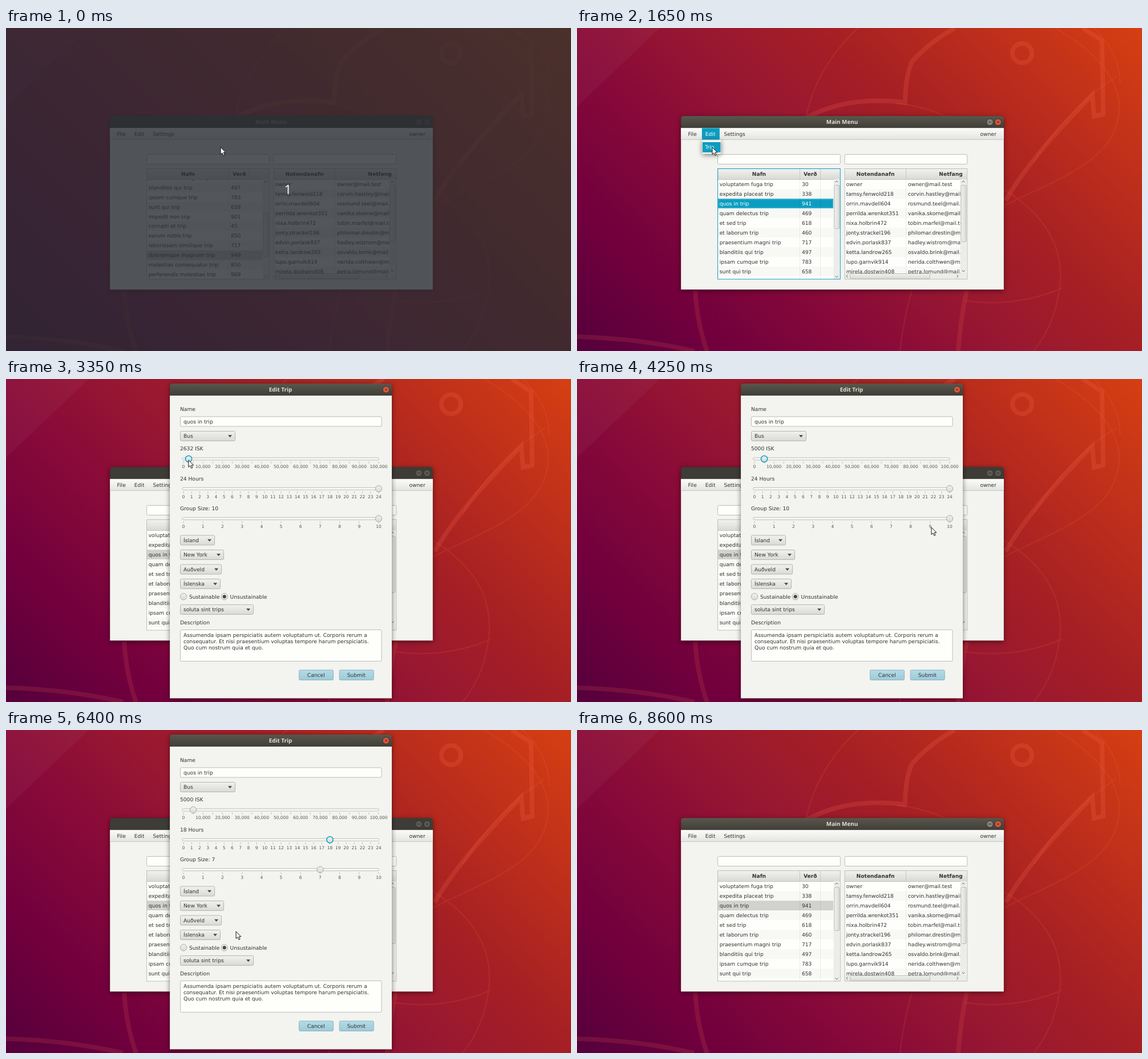
Write an HTML page that moves like this. It is 990 px wide and 566 px high and loops after 8650 ms.

```html
<!DOCTYPE html>
<html lang="is">
<head>
<meta charset="utf-8">
<title>Edit Trip</title>
<style>
  html, body { margin: 0; width: 100%; height: 100%; overflow: hidden; background: #8c0f38; }
  svg { display: block; width: 100%; height: 100%; }
  text { font: 9.15px "DejaVu Sans", sans-serif; fill: #333; text-rendering: geometricPrecision; white-space: pre; }
  .bold { font-weight: bold; }
  .tick { font-size: 7.5px; fill: #555; }
  .title { font: bold 9.85px "Noto Sans", sans-serif; }
  .count { font: 22.5px "Open Sans", sans-serif; fill: #fff; }
  .shadow { filter: drop-shadow(0 2px 4.5px rgba(0, 0, 0, .5)); }
  .wall { fill: none; stroke: #ff6a50; }
</style>
</head>
<body>
<svg viewBox="0 0 990 566" preserveAspectRatio="none">
  <defs>
    <linearGradient id="wall" gradientUnits="userSpaceOnUse" x1="0" y1="566" x2="778" y2="-212">
      <stop offset="0" stop-color="#55003c"/>
      <stop offset=".17" stop-color="#72003d"/>
      <stop offset=".36" stop-color="#8a0b38"/>
      <stop offset=".5" stop-color="#991831"/>
      <stop offset=".64" stop-color="#a51f24"/>
      <stop offset=".8" stop-color="#bb2d1c"/>
      <stop offset="1" stop-color="#d63f12"/>
    </linearGradient>
    <linearGradient id="bar" x2="0" y2="1"><stop stop-color="#59574d"/><stop offset="1" stop-color="#3f3e37"/></linearGradient>
    <linearGradient id="menu" x2="0" y2="1"><stop stop-color="#fbfbf9"/><stop offset="1" stop-color="#e4e4e1"/></linearGradient>
    <linearGradient id="grey" x2="0" y2="1"><stop stop-color="#f1f1ee"/><stop offset="1" stop-color="#d9d9d6"/></linearGradient>
    <linearGradient id="thumb" x2="1" y2="0"><stop stop-color="#f1f1ee"/><stop offset="1" stop-color="#d9d9d6"/></linearGradient>
    <linearGradient id="blue" x2="0" y2="1"><stop stop-color="#b3dbe7"/><stop offset="1" stop-color="#9dcad9"/></linearGradient>
    <clipPath id="leftRows"><rect x="247" y="265" width="202.5" height="175"/></clipPath>
    <clipPath id="rightRows"><rect x="469" y="247" width="203" height="183"/></clipPath>
    <clipPath id="rightHead"><rect x="469" y="247" width="214" height="18"/></clipPath>
  </defs>
  <rect width="990" height="566" fill="url(#wall)"/>
  <path d="M0 0H145L0 138Z" fill="#fff" opacity=".035"/>
  <g class="wall" stroke-width="8" opacity=".2">
    <circle cx="780" cy="44" r="17"/>
    <path d="M575 132C575 95 581 72 587 59Q618 24 662 0M886 0L920 22L922 151L906 155L903 117C850 172 792 232 751 302M398 160Q470 117 578 131"/>
    <path d="M683 460Q672 510 668 566M207 460Q211 520 228 566M0 541Q110 544 205 566" opacity=".75"/>
  </g>
  <g class="wall" stroke-width="2.5" opacity=".13">
    <path d="M401 158Q418 70 492 0M560 132Q610 137 648 156M838 0C925 50 965 110 945 170C925 240 830 270 747 312M748 283Q850 345 847 440Q842 515 800 566M680 478Q770 490 850 456M945 85Q860 140 800 235M587 460Q572 510 566 566M905 0Q950 40 952 98"/>
  </g>
  <g id="main"></g>
  <g id="dialog"></g>
  <g id="overlay">
    <rect width="990" height="566" fill="#282d33" opacity=".8"/>
    <text class="count" x="494" y="291" text-anchor="middle">1</text>
  </g>
  <path id="cursor" d="M0 0V12.4L2.8 9.9L4.9 14.4L7 13.4L5 9.1H8.8Z" fill="#fff" stroke="#111" stroke-linejoin="round"/>
</svg>
<script>
const LOOP = 8650, STEP = 50;
const ACCENT = '#0b9dc0', BODY = '#f3f3ef', LINE = '#bcbcb8';
const TITLE_H = 21.2, ROW_H = 16.97, TABLE_W = 215.7, LEFT = 246.1, RIGHT = 468.6;

const trips = `voluptatem fuga 30,expedita placeat 338,quos in 941,quam delectus 469,et sed 618,et laborum 460,
praesentium magni 717,blanditiis qui 497,ipsam cumque 783,sunt qui 658,impedit non 901,corrupti et 45,earum nobis 850,
laboriosam similique 717,doloremque magnam 949,molestias consequatur 850,perferendis molestiae 969`
  .split(',').map(s => s.trim().match(/(.+) (\d+)/).slice(1));

const users = `owner owner@mail.test|tamsy.fenwold218 corvin.hastley@mail.test|orrin.mavdell604 rosmund.teel@mail.test
perrilda.wrenkot351 vanika.skorne@mail.test|nixa.holbrin472 tobin.marfel@mail.test|jonty.strackel196 philomar.drestin@mail.test
edvin.porlask837 hadley.wistrom@mail.test|ketta.landrow265 osvaldo.brink@mail.test|lupo.garnvik914 nerida.colthwen@mail.test
mirela.dostwin408 petra.lomund@mail.test`.split(/[|\n]/).map(s => s.split(' '));

// [time, x, y] of the pointer tip
const pointer = [
  [0, 376, 209], [100, 376, 209], [350, 300, 306], [1050, 300, 306], [1350, 233, 188], [1500, 233, 188],
  [1650, 237, 209], [2050, 237, 209], [2400, 447, 111], [2900, 314, 142], [3100, 314, 142], [3700, 328, 142],
  [3850, 328, 143], [4250, 621, 260], [4400, 653, 246], [4450, 653, 246], [4750, 550, 246], [4900, 524, 237],
  [5450, 645, 190], [5700, 650, 193], [5750, 653, 193], [6100, 567, 193], [6400, 403, 353], [6500, 442, 457],
  [6600, 442, 457], [6800, 569, 479], [7000, 569, 479], [7150, 618, 498], [7350, 550, 520], [7400, 548, 518],
  [8000, 548, 518], [8550, 44, 566]
];
const price = [[3100, 941], [3700, 5000]];
const group = [[4450, 10], [4750, 7]];
const hours = [[5750, 24], [6100, 18]];
const focusTimes = [[7850, 'cancel'], [5700, 'hours'], [4400, 'group'], [3000, 'price'], [0, 'name']];

const clamp = v => Math.min(1, Math.max(0, v));

function track(keys, t) {
  const next = keys.findIndex(k => k[0] > t);
  if (next === 0) return keys[0].slice(1);
  if (next < 0) return keys[keys.length - 1].slice(1);
  const a = keys[next - 1], b = keys[next], p = (t - a[0]) / (b[0] - a[0]);
  return a.slice(1).map((v, i) => v + (b[i + 1] - v) * p);
}

const rect = (x, y, w, h, fill, extra = '') =>
  `<rect x="${x}" y="${y}" width="${w}" height="${h}" fill="${fill}" ${extra}/>`;
const frame = (x, y, w, h, fill, stroke = LINE, r = 2) =>
  rect(x + .5, y + .5, w - 1, h - 1, fill, `stroke="${stroke}" rx="${r}"`);
const path = (d, stroke, width = 1) => `<path d="${d}" fill="none" stroke="${stroke}" stroke-width="${width}"/>`;
const circle = (x, y, r, fill, stroke = 'none', width = 1) =>
  `<circle cx="${x}" cy="${y}" r="${r}" fill="${fill}" stroke="${stroke}" stroke-width="${width}"/>`;
// y is the middle of the capitals
const label = (x, y, s, extra = '') => `<text x="${x}" y="${y + 3.3}" ${extra}>${s}</text>`;
const centred = (x, y, s, cls = '') => label(x, y, s, `text-anchor="middle" class="${cls}"`);

function windowFrame(x, y, w, h, title, active, canMinimise) {
  const cy = y + 10.7, cx = x + w - 10, dark = '#34332e';
  const top = `M${x} ${y + TITLE_H}V${y + 5}q0-5 5-5h${w - 10}q5 0 5 5V${y + TITLE_H}Z`;
  return `<g class="shadow"><path d="${top}" fill="${active ? 'url(#bar)' : '#3d3c36'}"/>` +
    rect(x, y + TITLE_H, w, h - TITLE_H, BODY) + '</g>' +
    `<text class="title" text-anchor="middle" x="${x + w / 2 - .5}" y="${y + 14}" style="fill:${active ? '#e2dfd5' : '#8b897f'}">${title}</text>` +
    circle(cx, cy, 5.8, active ? '#e0553a' : '#5c5a52', dark) +
    path(`M${cx - 2} ${cy - 2}l4 4m0-4l-4 4`, dark) +
    (canMinimise ? circle(cx - 14.3, cy, 5.8, active ? '#858277' : '#5c5a52', dark) + path(`M${cx - 16.8} ${cy}h5`, dark) : '');
}

function verticalBar(x, top, bottom, thumbY, thumbH) {
  const mid = x + 5.5;
  return rect(x, top, 11, bottom - top, '#ececea') + frame(x + 1, thumbY, 10, thumbH, 'url(#thumb)') +
    path(`M${mid - 2.5} ${top + 5.5}l2.5-2.5 2.5 2.5M${mid - 2.5} ${bottom - 5.5}l2.5 2.5 2.5-2.5`, '#666');
}

function mainWindow({ active, tableFocus, scroll, selected, menu, hover }) {
  const lit = menu !== 'none';
  let out = windowFrame(182.2, 154.2, 565.6, 304.1, 'Main Menu', active, true) +
    rect(182.2, 175.4, 565.6, 20, 'url(#menu)') + rect(182.2, 195, 565.6, 1, '#c6c6c2') +
    (lit ? rect(218.9, 175.4, 31, 20, ACCENT) : '') +
    label(194.5, 186, 'File') + label(224.8, 186, 'Edit', lit ? 'style="fill:#fff"' : '') +
    label(257.4, 186, 'Settings') + label(734.7, 186, 'owner', 'text-anchor="end"') +
    frame(LEFT, 221, TABLE_W, 18, '#fefefb') + frame(RIGHT, 221, TABLE_W, 18, '#fefefb');

  out += rect(LEFT, 246, TABLE_W, 194.5, '#fefefc') + '<g clip-path="url(#leftRows)">';
  trips.forEach(([name, cost], i) => {
    const y = 265.2 + ROW_H * i - scroll, on = i === selected;
    const ink = on && tableFocus ? 'style="fill:#fff"' : '';
    out += rect(247, y, 202.5, ROW_H, on ? (tableFocus ? ACCENT : '#d1d1ce') : i % 2 ? '#f8f8f5' : '#fefefc') +
      (on && tableFocus ? rect(248, y + 1, 200.5, ROW_H - 2, 'none', 'stroke="#5cc3da" stroke-width=".8"') : '') +
      label(249.7, y + 8.3, name + ' trip', ink) + label(394, y + 8.3, cost, ink);
  });
  out += path('M390.5 265V440M426.5 265V440', 'rgba(0,0,0,.07)') + '</g>' +
    rect(247, 247, 214, 18, 'url(#grey)') + path('M390.5 247V265M426.5 247V265M247 265.5H461', '#c6c6c2') +
    centred(319, 256, 'Nafn', 'bold') + centred(408.7, 256, 'Verð', 'bold') +
    verticalBar(449.5, 265, 440, 275 + 79 * scroll / 182, 77) +
    frame(LEFT, 246, TABLE_W, 194.6, 'none', tableFocus ? ACCENT : LINE, 0);

  out += rect(RIGHT, 246, TABLE_W, 194.5, '#fefefc') + '<g clip-path="url(#rightRows)">';
  users.forEach(([name, mail], i) => {
    const y = 265.2 + ROW_H * i;
    out += rect(469, y, 203, ROW_H, i % 2 ? '#f8f8f5' : '#fefefc') + label(471.7, y + 8.3, name) + label(580, y + 8.3, mail);
  });
  out += path('M576.5 265V430', 'rgba(0,0,0,.07)') + '</g>' +
    rect(469, 247, 214, 18, 'url(#grey)') + path('M576.5 247V265M469 265.5H683', '#c6c6c2') +
    centred(523, 256, 'Notendanafn', 'bold') + `<g clip-path="url(#rightHead)">${centred(655, 256, 'Netfang', 'bold')}</g>` +
    verticalBar(671.5, 265, 430, 275, 100) +
    rect(469, 430, 214, 10, '#ececea') + frame(478, 430, 141, 10, 'url(#grey)') +
    path('M474.5 432.5l-2.5 2.5 2.5 2.5M665.5 432.5l2.5 2.5-2.5 2.5', '#666') +
    frame(RIGHT, 246, TABLE_W, 194.6, 'none', LINE, 0);

  if (menu === 'open') out += rect(219.5, 196.5, 32.5, 24, '#f8f8f5', 'class="shadow"') +
    (hover ? rect(220, 200, 31.5, 18, ACCENT) : '') + label(224.3, 209, 'Trip', hover ? 'style="fill:#fff"' : '');
  return out;
}

function slider(y, max, tick, every, value, focused, format = String) {
  const at = v => 311 + 342 * v / max;
  let out = frame(308, y - 2.5, 346, 5, '#fafaf7', LINE, 2.5);
  for (let v = 0; v <= max; v += tick) out += path(`M${at(v)} ${y + 4.5}v3.5`, '#b0b0ac', .8);
  for (let v = 0; v <= max; v += every) out += `<text class="tick" text-anchor="middle" x="${at(v)}" y="${y + 16.4}">${format(v)}</text>`;
  return out + circle(at(value), y, 5.6, 'url(#grey)', focused ? ACCENT : '#a5a5a1', focused ? 1.5 : 1);
}

const combo = (y, w, s) => frame(305, y, w, 18, 'url(#grey)', '#b4b4b0') + label(311, y + 9, s) +
  `<path d="M${305 + w - 13} ${y + 7.2}h7l-3.5 4Z" fill="#444"/>`;

const button = (x, s, focused, hover) =>
  frame(x, 509.5, 61, 18.5, hover ? '#94c1cf' : 'url(#blue)', focused ? ACCENT : '#8fb3bf') + centred(x + 30.3, 519, s);

function dialogWindow({ active, focus, price, hours, group, hover }) {
  const named = focus === 'name';
  return windowFrame(287.1, 7.9, 388.9, 551.6, 'Edit Trip', active, false) +
    label(305, 52.7, 'Name') + frame(305, 65.5, 353.5, 18, '#fefefb', named ? ACCENT : LINE) +
    (named ? path('M304.5 65.5h354v18.5h-354Z', '#2bb5d2') + rect(311, 68.5, 52.5, 12, ACCENT) : '') +
    label(311, 74.7, 'quos in trip', named ? 'style="fill:#fff"' : '') +
    combo(91, 97, 'Bus') +
    label(305, 122, Math.round(price) + ' ISK') +
    slider(140, 1e5, 5000, 1e4, price, focus === 'price', v => v.toLocaleString('en-US')) +
    label(305, 174.3, Math.round(hours) + ' Hours') + slider(192.3, 24, 1, 1, hours, focus === 'hours') +
    label(305, 226.7, 'Group Size: ' + Math.round(group)) + slider(244.7, 10, 1, 1, group, focus === 'group') +
    combo(273.5, 61, 'Ísland') + combo(299, 77, 'New York') + combo(324.5, 73, 'Auðveld') + combo(350, 71, 'Íslenska') +
    circle(311, 381.3, 5.8, 'url(#grey)', '#b0b0ac') + label(321, 381.5, 'Sustainable') +
    circle(382.7, 381.3, 5.8, 'url(#grey)', '#b0b0ac') + circle(382.7, 381.3, 3, '#444') + label(392.5, 381.5, 'Unsustainable') +
    combo(395, 129, 'soluta sint trips') +
    label(305, 426.3, 'Description') + frame(305, 439, 353.5, 56, '#fefefb') +
    ['Assumenda ipsam perspiciatis autem voluptatum ut. Corporis rerum a',
      'consequatur. Et nisi praesentium voluptas tempore harum perspiciatis.',
      'Quo cum nostrum quia et quo.'].map((s, i) => label(311, 448.3 + 11.4 * i, s)).join('') +
    button(513, 'Cancel', focus === 'cancel', hover) + button(583.7, 'Submit');
}

const $ = id => document.getElementById(id);
const drawn = {};
function update(id, view, state) {
  const key = JSON.stringify(state);
  if (drawn[id] === key) return;
  drawn[id] = key;
  $(id).innerHTML = view(state);
}

function draw(t) {
  update('main', mainWindow, {
    active: t >= 100 && t < 2450 || t >= 7950,
    tableFocus: t >= 100 && t < 2100,
    scroll: [113, 85, 57, 28, 0][Math.min(4, Math.max(0, Math.floor((t - 350) / 100)))],
    selected: t < 1050 ? 14 : 2,
    menu: t < 1350 || t >= 2100 ? 'none' : t >= 1400 && t < 1850 ? 'open' : 'hover',
    hover: t >= 1600
  });

  const dialog = $('dialog');
  const opening = 1 - 2 ** (-10 * clamp((t - 2090) / 250));
  const left = 1 - clamp((t - 7997) / 250), closing = 1 - left * left;
  const scale = (.5 + .5 * opening) * (1 - .2 * closing);
  dialog.style.display = t >= 2100 && closing < 1 ? '' : 'none';
  dialog.setAttribute('opacity', opening * (1 - closing));
  dialog.setAttribute('transform', scale > .999 ? '' : `translate(481.5 284) scale(${scale}) translate(-481.5 -284)`);
  update('dialog', dialogWindow, {
    active: t >= 2450,
    focus: focusTimes.find(f => t >= f[0])[1],
    price: track(price, t)[0],
    hours: track(hours, t)[0],
    group: track(group, t)[0],
    hover: t >= 7350
  });

  $('overlay').setAttribute('opacity', (1 - clamp(t / 250)) ** 2);
  $('cursor').setAttribute('transform', `translate(${track(pointer, t)})`);
  $('cursor').style.display = t < 8600 ? '' : 'none';
}

const start = performance.now();
function tick() {
  const t = (performance.now() - start) % LOOP;
  draw(Math.floor(t / STEP) * STEP);
  requestAnimationFrame(tick);
}
tick();
</script>
</body>
</html>
```
